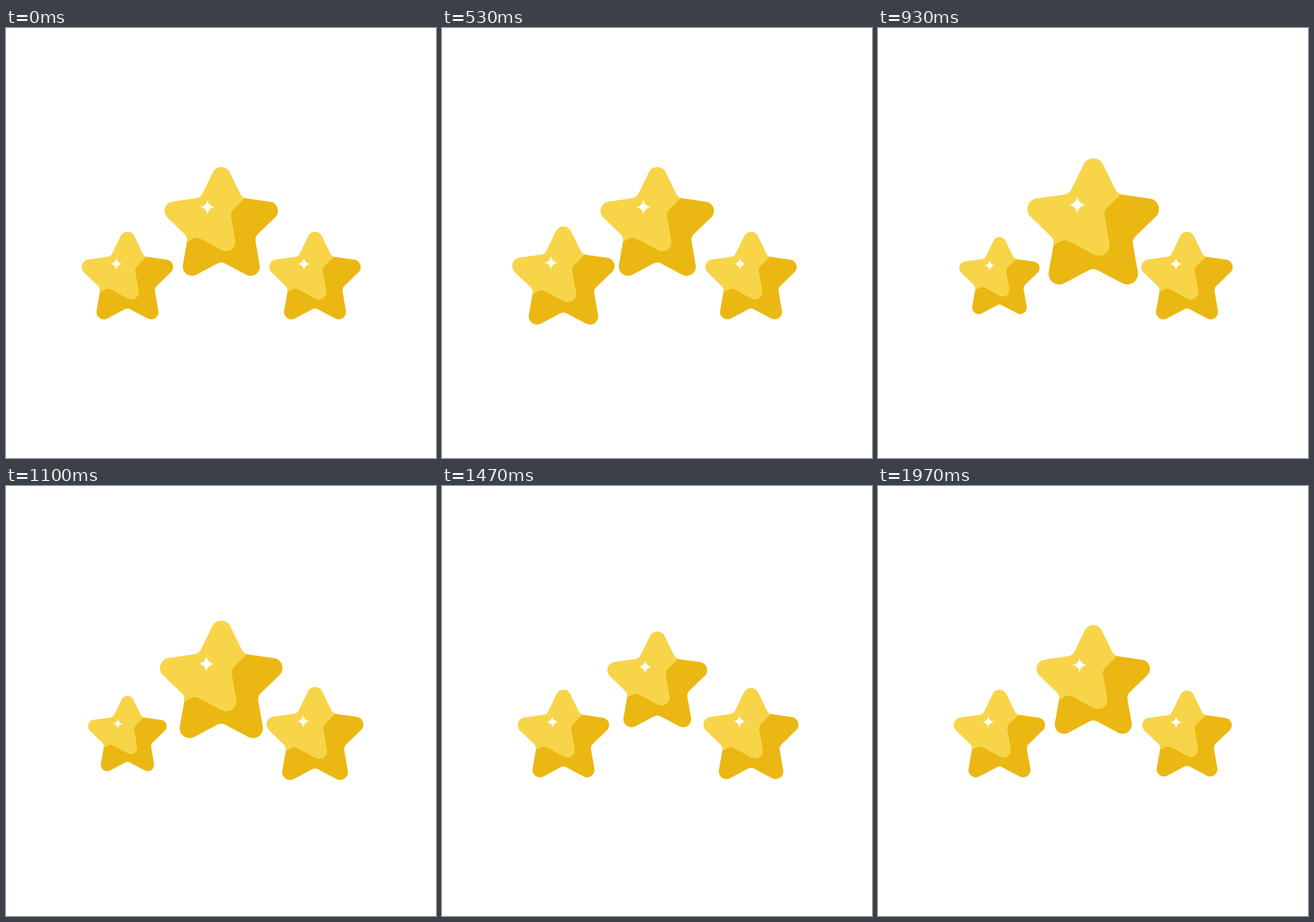
These frames come from a looping animation (748 px wide and 748 px high, 2 s). An HTML page with a canvas:

```html
<!DOCTYPE html>
<html lang="en">
<head>
<meta charset="utf-8">
<title>Three pulsing stars</title>
<style>
  html, body { margin: 0; width: 100%; height: 100%; overflow: hidden; background: #fff; }
  canvas { display: block; width: 100vw; height: 100vh; }
</style>
</head>
<body>
<canvas id="stage" width="748" height="748"></canvas>
<script>
const ctx = document.getElementById('stage').getContext('2d');
const SIZE = 748, LOOP = 2000, BEAT = 1000 / 3;
const LIGHT = '#f8d548', DARK = '#ebb713';

// Geometry of the full-size star, measured from its centre.
const OUTER = 123.3, INNER = 61.2, TIP_R = 16, NOTCH_R = 14;
const SHADE = { x: -42.5, y: -43 };
const PIVOT_Y = -8.3;

const STARS = [
  { x: 211.3, y: 430.7, size: 0.805, start: BEAT },
  { x: 374.5, y: 336.5, size: 1, start: 2 * BEAT },
  { x: 537.6, y: 430.7, size: 0.805, start: 3 * BEAT }
];

// Even corners are tips, odd ones notches, clockwise from the top.
const corners = Array.from({ length: 10 }, (_, i) => {
  const angle = (i * 36 - 90) * Math.PI / 180;
  const dist = i % 2 ? INNER : OUTER;
  return {
    x: Math.cos(angle) * dist,
    y: Math.sin(angle) * dist,
    r: i % 2 ? NOTCH_R : TIP_R
  };
});

function roundCorner(path, a, b) {
  path.arcTo(a.x, a.y, b.x, b.y, a.r);
}

function makeStar() {
  const path = new Path2D();
  const first = corners[0], last = corners[9];
  path.moveTo((first.x + last.x) / 2, (first.y + last.y) / 2);
  corners.forEach((c, i) => roundCorner(path, c, corners[(i + 1) % 10]));
  path.closePath();
  return path;
}

// The lit face ends along the lower right side of a shifted star.
function makeFace() {
  const path = new Path2D();
  const edge = corners.slice(2, 7).map(c => ({ x: c.x + SHADE.x, y: c.y + SHADE.y, r: c.r }));
  path.moveTo(edge[0].x, edge[0].y);
  for (let i = 1; i < 4; i++) roundCorner(path, edge[i], edge[i + 1]);
  path.lineTo(edge[4].x, edge[4].y);
  path.lineTo(-200, 57);
  path.lineTo(-200, -200);
  path.lineTo(75, -200);
  path.closePath();
  return path;
}

function makeGlint(x, y, r) {
  const path = new Path2D();
  const c = r * 0.15;
  path.moveTo(x, y - r);
  path.quadraticCurveTo(x + c, y - c, x + r, y);
  path.quadraticCurveTo(x + c, y + c, x, y + r);
  path.quadraticCurveTo(x - c, y + c, x - r, y);
  path.quadraticCurveTo(x - c, y - c, x, y - r);
  return path;
}

const star = makeStar(), face = makeFace(), glint = makeGlint(-24, -33.3, 12.5);

// Linear pulse over three beats: 1 -> 1.2 -> 0.8 -> 1.
function pulse(t) {
  const b = t / BEAT;
  if (b <= 0 || b >= 3) return 1;
  if (b < 1) return 1 + 0.2 * b;
  if (b < 2) return 1.2 - 0.4 * (b - 1);
  return 0.8 + 0.2 * (b - 2);
}

// Thirty steps a second, each held from the nearest 10 ms.
function stepTime(t) {
  const rest = t % 100;
  const step = Math.floor(t / 100) * 3 + (rest >= 70 ? 2 : rest >= 30 ? 1 : 0);
  return step * 100 / 3;
}

function drawStar(s, t) {
  const k = s.size * pulse(t - s.start);
  ctx.save();
  ctx.translate(s.x, s.y);
  ctx.scale(k, k);
  ctx.translate(0, -PIVOT_Y);
  ctx.fillStyle = DARK;
  ctx.fill(star);
  ctx.save();
  ctx.clip(star);
  ctx.fillStyle = LIGHT;
  ctx.fill(face);
  ctx.restore();
  ctx.fillStyle = '#fff';
  ctx.fill(glint);
  ctx.restore();
}

const begin = performance.now();

function render() {
  const t = stepTime((performance.now() - begin) % LOOP);
  ctx.fillStyle = '#fff';
  ctx.fillRect(0, 0, SIZE, SIZE);
  STARS.forEach(s => drawStar(s, t));
  requestAnimationFrame(render);
}
render();
</script>
</body>
</html>
```
